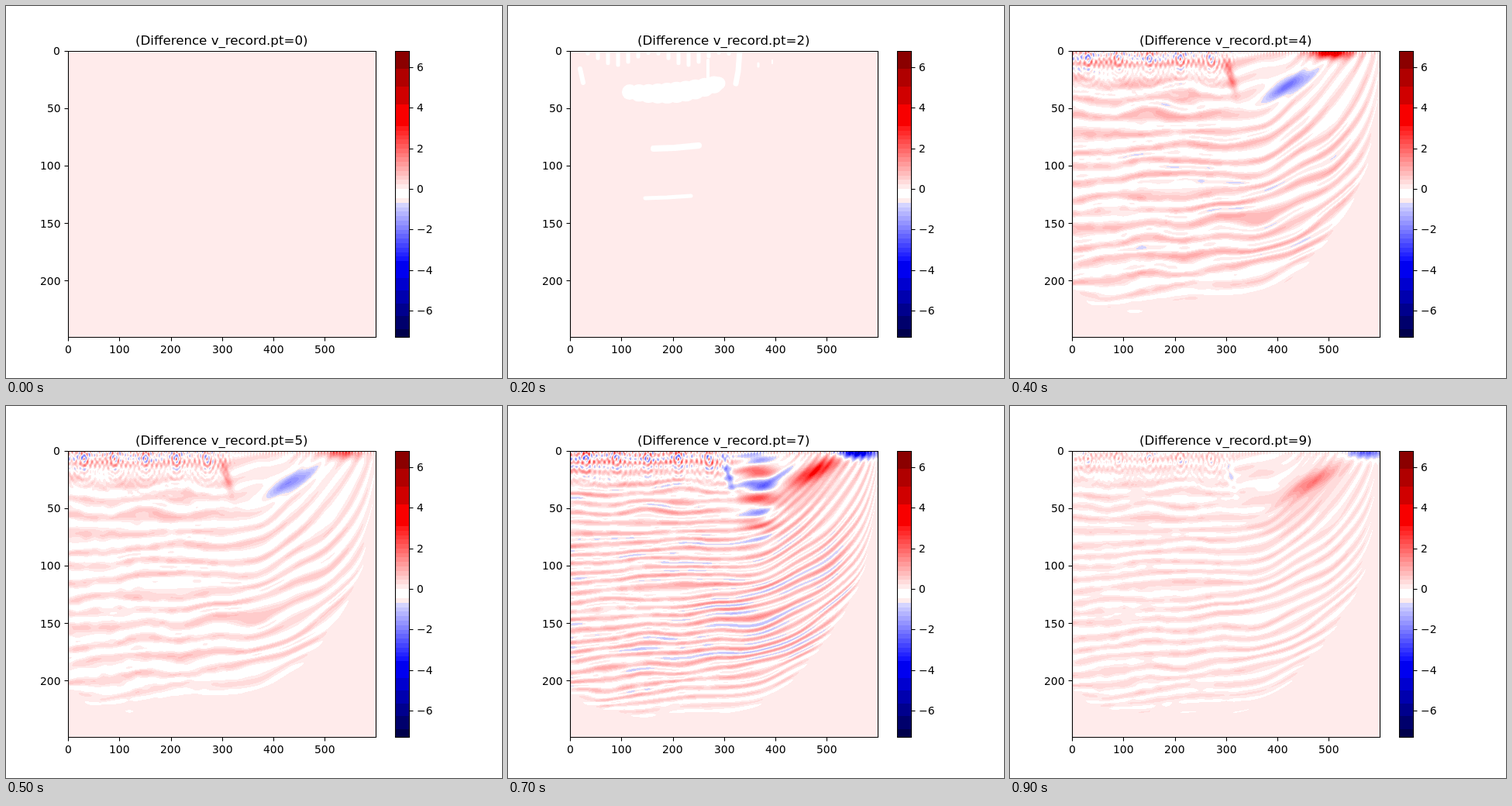
An HTML page with a canvas for the animation above (1000 ms loop, 640 px wide and 480 px high).

```html
<!DOCTYPE html>
<html lang="en">
<head>
<meta charset="utf-8">
<title>Difference record</title>
<style>
html, body { margin: 0; width: 100%; height: 100%; overflow: hidden; background: #fff; }
canvas, svg { position: absolute; left: 0; top: 0; width: 640px; height: 480px; display: block; }
text { font-family: "DejaVu Sans", sans-serif; font-size: 13.89px; fill: #000; }
#title { font-size: 16.67px; }
</style>
</head>
<body>
<canvas id="plot" width="640" height="480"></canvas>
<svg id="axes" viewBox="0 0 640 480"><text id="title" y="50"></text></svg>
<script>
const LEFT = 81, TOP = 59, W = 396, H = 368, TAU = Math.PI * 2, CALM = 0.05;
const ctx = document.getElementById("plot").getContext("2d");
const axes = document.getElementById("axes");
const title = document.getElementById("title");

const clamp = (v, a, b) => Math.max(a, Math.min(b, v));
const bell = (x, y, rx, ry) => Math.exp(-((x / rx) ** 2) - (y / ry) ** 2);
const smooth = (a, b, v) => {
  const t = clamp((v - a) / (b - a), 0, 1);
  return t * t * (3 - 2 * t);
};

// Contour bands: fine steps near zero, broad ones at the ends.
function color(v) {
  const shade = base => Math.round(base - 16 * Math.floor((Math.abs(v) - (v < 0 ? 0.68 : 0)) / 0.221));
  if (v >= 3.1) return [v < 4.16 ? 248 : v < 5.04 ? 208 : v < 5.92 ? 176 : 139, 0, 0];
  if (v >= 0) return [255, shade(235), shade(235)];
  if (v > -0.46) return [255, 255, 255];
  if (v > -0.68) return [254, 236, 236];
  if (v > -3.54) return [shade(212), shade(212), 255];
  return [0, 0, 240 - 33 * Math.max(0, Math.floor((-v - 3.75) / 0.63))];
}

// Smooth value noise in 0..1 from a seeded table.
let seed = 7;
const table = Array.from({ length: 1024 }, () => (seed = seed * 16807 % 2147483647) / 2147483647);
const cell = (i, j) => table[(i * 37 + j * 191 + (i * j) % 53 + 40000) & 1023];
function noise(x, y) {
  const i = Math.floor(x), j = Math.floor(y);
  const u = smooth(0, 1, x - i), w = smooth(0, 1, y - j);
  const a = cell(i, j), b = cell(i, j + 1);
  const p = a + (cell(i + 1, j) - a) * u;
  return p + (b + (cell(i + 1, j + 1) - b) * u - p) * w;
}

// Flat depth of the horizon through a point: level, then rising and fanning out to the right.
function depth(x, y) {
  const rise = 0.0028 * Math.max(0, x - 200) ** 2 + 55 * (Math.max(0, x - 350) / 47) ** 4;
  const d = (y + rise) / (1 + Math.max(0, 190 - x) * 0.00033);
  return d + 0.4 * smooth(250, 397, x) * Math.max(0, 200 - d);
}

// The layered zone narrows towards its base.
function zone(x, d, end) {
  const left = Math.max(0, d - 285) ** 2 / 25;
  const right = 397 - Math.max(0, d - 200) ** 2 / 120;
  return (1 - smooth(end - 60, end, d)) * (d > 285 ? smooth(-8, 22, x - left) : 1) * smooth(-6, 26, right - x);
}

// Ripples around evenly spaced shots, and a fine comb along the surface.
function ripples(x, y) {
  const comb = 0.45 * Math.cos(TAU * x / 3.97) * Math.exp(-y / 2.2);
  const side = 1 - smooth(196, 216, x);
  if (y > 60 || !side) return comb;
  const gap = 39.7, dx = x - 19 - gap * Math.round((x - 19) / gap);
  const r = Math.hypot(dx * 1.7, y - 9);
  const grid = Math.cos(TAU * x / 6.62) * Math.cos(TAU * y / 12 + 5 * noise(x / 20, y / 20));
  return comb + side * (0.5 * Math.exp(-((y / 25) ** 2)) * grid + Math.exp(-r / 14) * Math.cos(TAU * r / 9));
}

// Strong lobes to the right of the shots.
function lobes(x, y, m) {
  const u = x - m.beamX, w = y - m.beamY + 0.52 * u;
  let v = m.beam * bell(u, w, 32, 11);
  v += m.halo * bell(u + 18, w - 22, 50, 26);
  v += m.surface * bell(x - m.surfaceX, y, 25, 8);
  v += m.edge * bell(x - 203 - 0.25 * (y - 30), y - 30, 5, 22);
  v += m.train * Math.cos(TAU * (y - 25) / 35) * bell(x - 241, y - 45, 23, 60);
  return v - 0.75 * m.train * bell(x - 268, y - 31 + 0.6 * (x - 268), 22, 6);
}

function field(m) {
  const out = new Float32Array(W * H);
  for (let y = 0; y < H; y++) for (let x = 0; x < W; x++) {
    const d = depth(x, y), env = zone(x, d, m.end);
    let v = CALM + m.top * ripples(x, y) + lobes(x, y, m);
    if (env > 0) {
      const warp = noise(x / 48 + 5, d / 23) - 0.5;
      const gain = 0.3 + 1.1 * noise(x / 42, d / 13) + m.boost * bell(x - 245, d - 215, 85, 55);
      const wave = m.amp * gain * Math.cos(TAU * ((d - m.peak) / m.gap + 0.8 * warp));
      const grain = m.rough * (2 * noise(x / 11 + 30, d / 5.5) - 1) * (1 - 0.75 * smooth(150, 260, x));
      const mute = 1 - 0.75 * bell(x - 275, y - 35, 85, 38);
      v += env * mute * (m.bias + wave + grain);
    }
    out[y * W + x] = v;
  }
  return out;
}

function paint(values) {
  const img = ctx.createImageData(W, H);
  values.forEach((v, i) => img.data.set([...color(v), 255], i * 4));
  return img;
}
const mix = (a, b, t) => a.map((v, i) => v + (b[i] - v) * t);

const coarse = {
  gap: 20.1, peak: 298, end: 335, amp: 0.6, bias: 0.06, rough: 0.2, boost: 0.2, top: 1.5,
  beamX: 278, beamY: 43, beam: -2.2, halo: 0, surfaceX: 333, surface: 4.2, edge: 1.5, train: 0
};
const softer = {
  ...coarse, amp: 0.42, bias: 0.02, top: 1.7,
  beamX: 286, beamY: 39, beam: -1.9, surfaceX: 352, surface: 2.1, edge: 1.2
};
const fine = {
  ...coarse, gap: 12, peak: 254, end: 350, amp: 0.72, bias: 0.1, rough: 0.26, boost: 0.6, top: 2.2,
  beamX: 321, beamY: 26, beam: 2.1, halo: 0.5, surfaceX: 362, surface: -5, edge: -1.8, train: 1.6
};
const strong = { ...fine, top: 1.9, beamX: 316, beamY: 24, beam: 2.9, surfaceX: 368, train: 2.2 };
const pale = {
  ...fine, gap: 14.5, peak: 284, amp: 0.3, bias: 0.06, rough: 0.15, boost: 0.3, top: 0.8,
  beamX: 309, beamY: 38, beam: 1.5, halo: 0.3, surfaceX: 378, surface: -2.5, edge: -0.8, train: 0.25
};

const blank = new Float32Array(W * H).fill(CALM);
const [p4, p5, p6, p7, p9] = [coarse, softer, fine, strong, pale].map(field);
const images = [blank, blank, blank, mix(blank, p4, 0.4), p4, p5, p6, p7, mix(p7, p9, 0.5), p9].map(paint);

// First faint white shapes.
function line(width, ...p) {
  ctx.lineWidth = width;
  ctx.beginPath();
  for (let i = 0; i < p.length; i += 2) ctx.lineTo(p[i], p[i + 1]);
  ctx.stroke();
}
function faint() {
  ctx.save();
  ctx.beginPath();
  ctx.rect(LEFT, TOP, W, H);
  ctx.clip();
  ctx.strokeStyle = "#fff";
  ctx.lineCap = ctx.lineJoin = "round";
  for (let t = 0; t <= 1; t += 0.05) {
    const x = 157 + 121 * t, y = 111 + 14.7 * t - 28 * t * t;
    line(18 + 7 * Math.sin(Math.PI * t) + 2 * Math.cos(TAU * t * 10), x, y, x, y + 0.1);
  }
  for (let i = 0; i < 15; i++) line(5, 103 + i * 13, 57, 103 + i * 13, 68 + 8 * Math.sin(i * 0.9 - 1));
  line(8, 188, 184, 215, 183, 246, 180);
  line(5, 177, 248, 205, 247, 236, 245);
  line(6, 93, 81, 97, 99);
  line(7, 299, 57, 297, 84, 294, 100);
  line(4, 258, 70, 258, 100);
  line(3, 323, 74, 323, 78);
  line(2, 341, 70, 341, 74);
  ctx.restore();
}

function add(tag, attrs) {
  const el = document.createElementNS("http://www.w3.org/2000/svg", tag);
  for (const k in attrs) el.setAttribute(k, attrs[k]);
  return axes.appendChild(el);
}
const stroke = d => add("path", { d, fill: "none", stroke: "#000", "stroke-width": 1.1 });
const snap = v => Math.round(v) + 0.5;

// Whole-pixel text start; align is 0 for left, 0.5 for centre, 1 for right.
function place(el, text, x, align) {
  el.textContent = text;
  el.setAttribute("x", Math.round(x - align * el.getComputedTextLength()));
}
const label = (text, x, y, align) => place(add("text", { y: Math.round(y) }), text, x, align);

stroke("M80.5 58.5H477.5V427.5H80.5ZM502.5 58.5H520.5V427.5H502.5Z");
for (let v = 0; v <= 500; v += 100) {
  const x = 80.1 + v * 0.6624;
  stroke(`M${snap(x)} 428V432.5`);
  label(v, x, 448, 0.5);
}
for (let v = 0; v <= 200; v += 50) {
  const y = 57.6 + v * 1.4843;
  stroke(`M75.5 ${snap(y)}H80`);
  label(v, 70.3, y + 5.3, 1);
}
for (let v = -6; v <= 6; v += 2) {
  const y = 236 - v * 26.18;
  stroke(`M521 ${snap(y)}H525.5`);
  label(v < 0 ? "\u2212" + -v : v, 530, y + 5, 0);
}
for (let y = 58; y < 428; y++) {
  ctx.fillStyle = `rgb(${color((236 - y - 0.5) / 26.2)})`;
  ctx.fillRect(502, y, 19, 1);
}

let shown = -1;
function draw(now) {
  const step = Math.floor(now % 1000 / 100);
  if (step === shown) return;
  shown = step;
  ctx.putImageData(images[step], LEFT, TOP);
  if (step === 2) faint();
  place(title, `(Difference v_record.pt=${step})`, 278.4, 0.5);
}
const start = performance.now();
function tick() {
  draw(performance.now() - start);
  requestAnimationFrame(tick);
}
tick();
</script>
</body>
</html>
```
